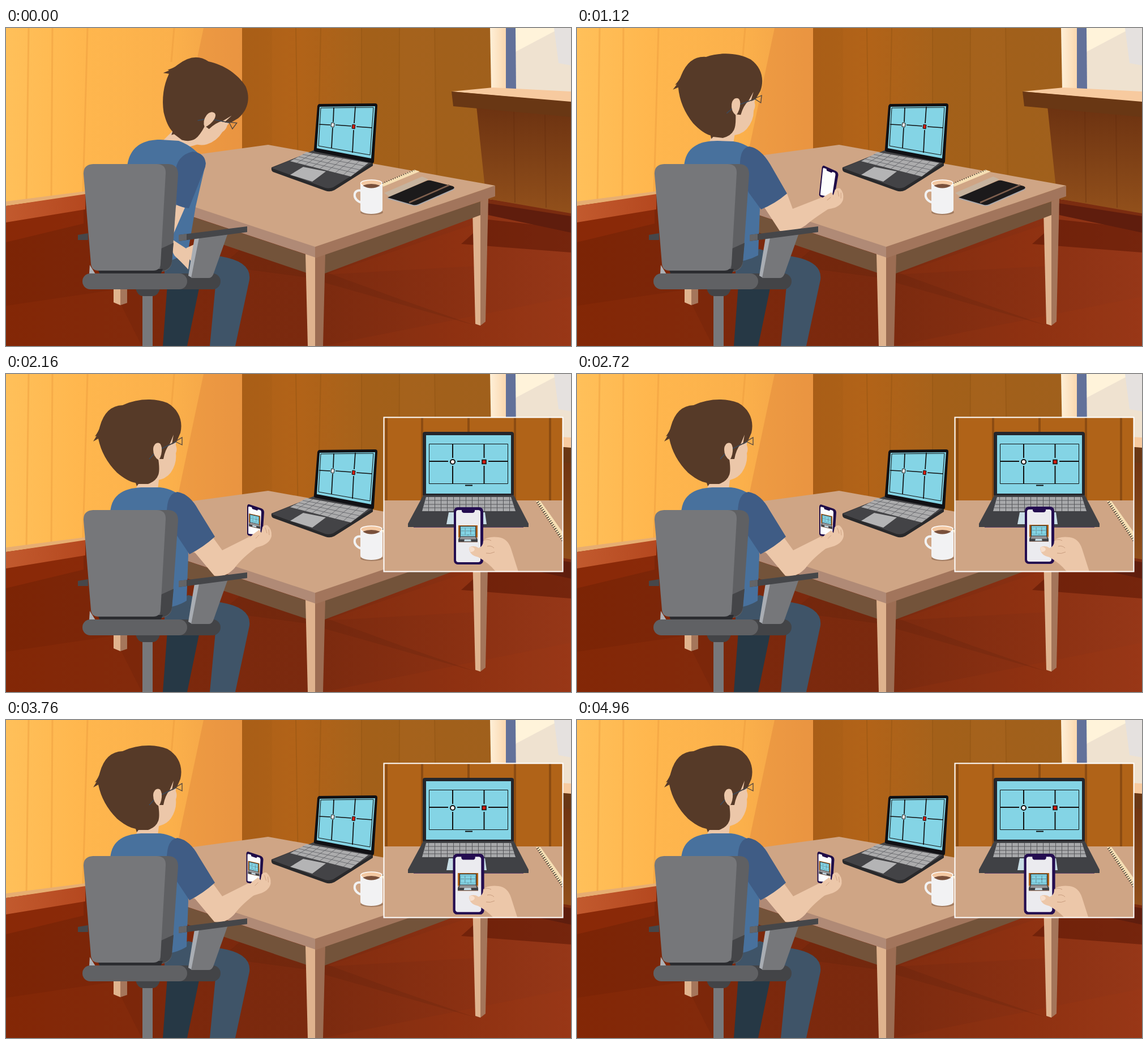
An HTML page for the animation above (5.04 s loop, 998 by 561 pixels).

```html
<!DOCTYPE html>
<html lang="en">
<head>
<meta charset="utf-8">
<title>Scanning a laptop screen with a phone</title>
<style>
  html, body { margin: 0; height: 100%; overflow: hidden; background: #84290c; }
  body > svg { display: block; width: 100vw; height: 100vh; }
  .skin { fill: #ecc7a9; }
  .line { fill: none; stroke: #111; }
</style>
</head>
<body>
<svg viewBox="0 0 998 561" preserveAspectRatio="none">
  <defs>
    <linearGradient id="sunny"><stop stop-color="#ffc05a"/><stop offset=".3" stop-color="#ffb74e"/><stop offset=".7" stop-color="#fbb04b"/><stop offset="1" stop-color="#f0a046"/></linearGradient>
    <linearGradient id="wood"><stop stop-color="#ad6018"/><stop offset=".22" stop-color="#b26318"/><stop offset=".5" stop-color="#a6621b"/><stop offset="1" stop-color="#a3621e"/></linearGradient>
    <linearGradient id="floor"><stop stop-color="#7c2405"/><stop offset=".3" stop-color="#7c280c"/><stop offset=".55" stop-color="#7b2a0f"/><stop offset=".8" stop-color="#8a3012"/><stop offset="1" stop-color="#963718"/></linearGradient>
    <linearGradient id="panel" x2="0" y2="1"><stop stop-color="#6c3211"/><stop offset="1" stop-color="#92501b"/></linearGradient>
    <linearGradient id="frame"><stop stop-color="#fff0d8"/><stop offset="1" stop-color="#f9d6ad"/></linearGradient>
    <linearGradient id="skirting"><stop stop-color="#c25a2e"/><stop offset="1" stop-color="#b5481f"/></linearGradient>
    <clipPath id="insetClip"><path d="M667 76H984V349H667Z"/></clipPath>
  </defs>

  <!-- room -->
  <path fill="url(#floor)" d="M0 280H998V561H0Z"/>
  <path fill="#982f0a" opacity=".5" d="M0 343L137 320V345L0 378Z"/>
  <path fill="#a83a14" opacity=".14" d="M0 490L190 462 240 561H0ZM560 561L998 474V561ZM563 435L830 345V420Z"/>
  <path fill="#56200c" opacity=".2" d="M380 420L530 440 830 525 700 480 563 430 420 385Z"/>
  <path fill="#5c1705" opacity=".55" d="M804 381L852 338 998 354V396Z"/>
  <path fill="url(#sunny)" d="M0 0H418V260L0 313Z"/>
  <path fill="#e48a3c" opacity=".5" d="M349 0H418V220L300 232Z"/>
  <path fill="none" stroke="#e8963a" stroke-width="3" opacity=".4" d="M144 0L136 290M297 0L292 60M82 0L80 300M40 0L36 308"/>
  <path fill="#e7ae72" d="M0 306L140 288V294L0 314Z"/>
  <path fill="url(#skirting)" d="M0 314L140 293V320L0 343Z"/>
  <path fill="url(#wood)" d="M417 0H858V310H417Z"/>
  <path fill="#8a4d12" opacity=".1" d="M417 0H470V260H417ZM628 0H695V270H628ZM757 0H858V310H757Z"/>
  <path fill="none" stroke="#8d5013" stroke-width="2" opacity=".4" d="M512 0L516 260M556 0L553 140M695 0L694 260M757 0L761 260M628 0V135"/>
  <path fill="#5f1d0d" d="M850 302L998 325V361L852 330Z"/>
  <path fill="#7b2c10" d="M850 302L998 325V332L850 309Z"/>
  <path fill="url(#panel)" d="M831 138H998V327L848 301Z"/>
  <path fill="none" stroke="#5c2a0d" opacity=".3" stroke-width="2" d="M897 145L899 308M952 150L954 317"/>
  <path fill="#efe2d0" d="M898 0H998V120H898Z"/>
  <path fill="#fff3da" d="M900 0H968L972 4 900 42Z"/>
  <path fill="#e5e1df" d="M968 0H998V66L976 62Z"/>
  <path fill="url(#frame)" d="M855 0H884V108H857Z"/>
  <path fill="#62719a" d="M883 0H900L901 108H883Z"/>
  <path fill="#f7ca9f" d="M787 112L860 105 998 112V131Z"/>
  <path fill="#693714" d="M787 112L998 130V157L790 138Z"/>

  <!-- table -->
  <path fill="#e0b48e" d="M190 450H202V489L190 484Z"/><path fill="#a5765b" d="M202 450H214V485L202 489Z"/>
  <path fill="#dfb38e" d="M824 320H838V525L829 522Z"/>
  <path fill="#73533a" d="M200 290L531 400V432L200 320ZM563 398L838 306V330L563 433Z"/>
  <path fill="#a4755a" d="M838 306L852 300 847 518 838 525Z"/>
  <path fill="#dfb38e" d="M529 398L547 404 546 561H533Z"/><path fill="#9c6d53" d="M546 404L564 397 560 561H546Z"/>
  <path fill="#b08a76" d="M170 262L547 385V405L170 280Z"/>
  <path fill="#a2755c" d="M546 385L864 278V297L546 406Z"/>
  <path fill="#cfa585" d="M170 246L463 206 864 278 546 386 170 262Z"/>

  <!-- laptop -->
  <path fill="#29292b" d="M469 246L545 216 648 238V243L580 286Q572 290 564 287L472 254Q468 252 469 246Z"/>
  <path fill="#434346" d="M469 247L545 215 648 237 578 281Q571 284 564 282Z"/>
  <path fill="#acacad" d="M531 219L640 238 609 262 502 235Z"/>
  <path class="line" stroke-width=".9" style="stroke:#66676b" d="M524 223L632 243M517 227L624 250M509 231L617 256M542 221L514 238M555 223L528 242M569 226L541 245M582 228L555 248M596 230L568 252M610 233L582 255M624 235L596 259"/>
  <path fill="#b4b4b5" d="M525 245L565 253 541 271 502 259Z"/>
  <path fill="#101014" d="M554 134L652 133Q656 133 656 137L650 235Q650 239 646 238L546 218Q543 217 544 213L550 138Q551 134 554 134Z"/>
  <path fill="#84d4e5" d="M554 139L652 138 645 230 549 212Z"/>
  <path class="line" d="M556 141L649 140 643 224 552 208Z"/>
  <path class="line" stroke-width="1.7" d="M579 140L578 166M577 176L575 212M617 139L615 168M614 180L612 220M553 170L573 171M582 171L610 173M619 174L647 176"/>
  <path fill="#fff" stroke="#111" d="M575 167L580 168 579 175 574 174Z"/>
  <path fill="#d21c10" stroke="#111" d="M612 170L617 171 616 178 611 177Z"/>

  <!-- ruler, tablet, mug -->
  <path fill="#c7b39e" d="M668 291L735 262 746 267 678 298Z"/>
  <path fill="#f6dfb4" d="M664 275L721 250 731 253 666 280Z"/>
  <path class="line" stroke-dasharray="1 3" stroke-width="2" d="M665 274L721 251"/>
  <path fill="#a9a9ad" d="M673 301L744 270 792 283V285L728 313Q722 315 717 313Z"/>
  <path fill="#1c1a1b" d="M674 299L742 270Q746 268 750 269L789 279Q794 281 790 284L728 311Q723 313 719 312Z"/>
  <path fill="none" stroke="#80604e" stroke-width="2.5" d="M712 308L783 277"/>
  <ellipse cx="646" cy="325" rx="20" ry="5" fill="#87634c" opacity=".6"/>
  <path fill="none" stroke="#f2f2f2" stroke-width="4" d="M628 287C612 283 611 305 629 308"/>
  <path fill="#f2f2f3" d="M626 273H665V320Q665 327 645 328 626 327 626 320Z"/>
  <ellipse cx="645.5" cy="274" rx="19" ry="6" fill="#f3c8a2" stroke="#fff" stroke-width="1.5"/>
  <path fill="#79503b" d="M630 278Q645 272 661 278 645 287 630 278Z"/>

  <!-- person -->
  <path fill="#263845" d="M286 440H345L320 561H277Z"/>
  <path fill="#3f5468" d="M280 410L322 390Q355 400 380 403 434 412 430 444L405 561H360L370 455 280 450Z"/>
  <path class="skin" id="neck"/>
  <path fill="#48719d" id="torso"/>
  <path class="skin" id="arm"/>
  <path fill="#3f5c85" id="sleeve"/>
  <g id="head"><g transform="translate(-233.5 -118)">
    <path class="skin" d="M262 110L300 108 300 126Q303 132 300 140 302 158 291 174 282 186 264 188L245 195Z"/>
    <path fill="#563a28" d="M154 119L160 109 157 110Q164 101 166 92 176 56 206 55C232 43 262 42 285 51 306 63 313 84 308 104L302 118Q297 123 293 124L296 107 289 124Q281 133 278 150L269 150Q272 170 269 178 265 189 251 194L234 194 231 198 229 192Q215 190 196 174 170 148 163 114Z"/>
    <path fill="none" stroke="#3b4b5e" stroke-width="1.5" d="M253 150L266 136 301 119"/>
    <path fill="none" stroke="#4d443f" stroke-width="1.3" d="M289 125L311 112 311 125 299 119"/>
    <path class="skin" d="M264 123Q273 118 275 130 276 142 270 152 260 146 260 133 260 127 264 123Z"/>
  </g></g>

  <g id="wobble"><g id="grip"><g transform="translate(-450 -287)">
    <path fill="#1f0c48" d="M430 230L451 237Q456 239 456 244L453 286Q453 290 449 289L429 285Q426 284 426 281V233Q427 229 430 230Z"/>
    <path fill="#fdfdfd" d="M430 234L434 235 435 238 444 241 445 239 449 240Q451 241 451 244L449 284 429 282Q428 282 428 280V236Q428 233 430 234Z"/>
    <g class="camera" transform="translate(429 246) skewY(13)"><svg width="20" height="23" viewBox="720 95 194 180" preserveAspectRatio="none"><use href="#desk"/></svg></g>
    <path class="skin" d="M427 292L436 283 447 275 451 280 453 270Q457 265 462 267 470 274 469 286 466 299 449 304L436 308Z"/>
    <path fill="none" stroke="#cfa383" d="M458 271L461 281M464 274L465 284M447 284L441 290"/>
  </g></g></g>

  <!-- chair -->
  <path fill="#46474a" d="M127 365L145 362V374H127Z"/>
  <path fill="#adb1b6" d="M148 418L158 434H147Z"/>
  <path fill="#77787b" d="M241 465H259V561H241Z"/>
  <path fill="#434447" d="M228 455H273Q270 473 258 473H243Q231 473 228 455ZM300 433H365A14 14 0 0 1 365 461H300Z"/>
  <path fill="#5f6063" d="M255 240H287Q304 241 304 258L293 414Q291 427 276 430L250 430Z"/>
  <path fill="#444548" d="M274 389L296 379 293 412Q291 427 272 430Z"/>
  <path fill="#2b2c30" d="M162 425H277L273 435H166Z"/>
  <path fill="#76777a" d="M154 240H266Q283 240 282 257L273 416Q272 428 260 428H163Q151 428 150 416L137 258Q136 241 154 240Z"/>
  <rect x="135" y="433" width="185" height="28" rx="14" fill="#606164"/>
  <path fill="#a9adb3" d="M333 370H342L329 441 322 437Z"/>
  <path fill="#76777a" d="M341 370L392 362 366 435Q363 441 358 441H327Z"/>
  <path fill="#454649" d="M305 365L426 350V360L305 376Z"/>
  <path fill="#636467" d="M305 365L319 363V374L305 376Z"/>

  <!-- close-up -->
  <g id="inset">
    <g clip-path="url(#insetClip)">
      <g id="desk">
        <path fill="#b06318" d="M667 76H984V224H667Z"/>
        <path fill="none" stroke="#8c4c12" stroke-width="4" d="M672 76V224M735 76V224M817 76V224M899 76V224M961 76V224"/>
        <path fill="#cfa585" d="M667 223H984V349H667Z"/>
        <rect x="736" y="102" width="161" height="114" rx="4" fill="#25262b"/>
        <path fill="#84d4e5" d="M742 108H892V211H742Z"/>
        <path class="line" d="M747.5 123.5H886.5V193.5H747.5Z"/>
        <path class="line" stroke-width="2" d="M789 123V148M789 162V193M844.5 123V148M844.5 162V193M748 154H781M797 154H837M852 154H886M811 196.5H824"/>
        <circle cx="789" cy="155" r="4" fill="#fff" stroke="#111" stroke-width="2"/>
        <path fill="#d21c10" stroke="#111" stroke-width="1.5" d="M841 151.500H848V158.500H841Z"/>
        <path fill="#404145" d="M737 214H897L923 264V270H710V264Z"/>
        <path fill="#a8a9ab" d="M742 217H892L900 242H735Z"/>
        <path class="line" style="stroke:#56575b" d="M741 223H894M739 230H896M737 236H898"/>
        <path class="line" style="stroke:#56575b" stroke-width="25" stroke-dasharray="1 10" d="M746 229.500H894"/>
        <path fill="#c8dde5" d="M782 244H846L849 265H778Z"/>
        <path fill="none" stroke="#6b4a70" d="M720 270.500H914"/>
        <path fill="#f6dfb4" d="M936 224H944L984 280V296Z"/>
        <path class="line" stroke-width="5" stroke-dasharray="1 3" d="M939 226L984 294"/>
      </g>
      <g id="phone">
        <rect width="52" height="101" rx="7" fill="#240d50"/>
        <rect x="4" y="5" width="43" height="92" rx="4" fill="#ebebef"/>
        <path fill="#240d50" d="M14 4H37V7Q36 10 33 10H18Q15 10 14 7Z"/>
        <svg class="camera" x="8" y="32" width="34" height="30" viewBox="720 95 194 180" preserveAspectRatio="none"><use href="#desk"/></svg>
      </g>
      <g id="thumb">
        <path class="skin" d="M818 306Q826 301 835 307 843 304 843 294 850 286 870 288 886 290 892 308L907 355H870Q856 335 834 323 818 320 818 306Z"/>
        <path fill="#f8dfcc" d="M818 306Q825 303 828 309 827 314 820 314Z"/>
        <path fill="none" stroke="#c99d7f" d="M843 294Q850 290 857 294M850 304Q857 302 862 307M848 316Q855 318 863 314"/>
      </g>
    </g>
    <path fill="none" stroke="#fff" stroke-width="2" d="M667.500 76.500H983.500V348.500H667.500Z"/>
  </g>
</svg>
<script>
const LOOP = 5040, STEP = 80, RISE = 1520;
const $ = id => document.getElementById(id);
const clamp = x => Math.min(1, Math.max(0, x));
const smooth = x => x * x * (3 - 2 * x);
const NUMBER = /-?\d*\.?\d+/g;

// Blends the numbers of two strings that share one structure.
function blend(a, b, k) {
  const ends = b.match(NUMBER);
  let i = 0;
  return a.replace(NUMBER, n => (+n + (ends[i++] - n) * k).toFixed(2));
}

function sample(stops, keys, x) {
  let i = 0;
  while (i < stops.length - 2 && x > stops[i + 1]) i++;
  return blend(keys[i], keys[i + 1], clamp((x - stops[i]) / (stops[i + 1] - stops[i])));
}

// Poses while the person sits up and raises the phone.
const RISE_STOPS = [0, .383, .828, 1];
const poses = {
  head: ["translate(342 126) rotate(36.7)", "translate(302 119.5) rotate(22.5)",
    "translate(248.5 116.5) rotate(6.3)", "translate(233.5 118) rotate(0)"],
  grip: ["translate(333 400) rotate(95) scale(.75)", "translate(403 386) rotate(42) scale(.87)",
    "translate(451 302) rotate(6) scale(1)", "translate(450 287) rotate(0) scale(1)"],
  neck: ["M298 178L350 202 322 210 276 200Z", "M273 180L318 190 300 208 260 200Z",
    "M238 188L280 180 276 204 234 202Z", "M234 188L271 178 268 204 230 202Z"],
  torso: [
    "M214 245C218 208 244 197 272 197L305 199Q335 210 353 238L335 315 322 392Q300 412 270 414L200 414Z",
    "M205 245C207 210 232 198 258 198L300 205Q325 212 335 240L325 322 322 402Q300 412 270 414L200 414Z",
    "M189 245C191 210 216 199 248 199L276 200Q303 204 320 225L323 320 320 401Q300 412 270 414L200 414Z",
    "M184 245C186 210 212 200 245 200L272 200Q300 203 318 225L322 320 319 400Q300 412 270 414L200 414Z"],
  arm: [
    "M301 311L316 317 292 372 326 394 322 426Q308 411 298 402 290 390 288 360Z",
    "M301 322L337 321 334 362 388 370 395 398Q370 392 340 390 315 389 300 387Z",
    "M330 315L371 292 381 319 432 299 446 318Q415 338 404 348 385 362 358 358Z",
    "M332 313L366 289 382 311 430 287 446 303Q416 325 404 342 388 360 368 356Z"],
  sleeve: [
    "M299 262Q298 225 330 218 356 222 352 245L323 318Q312 317 301 312L299 290Z",
    "M297 260Q297 222 320 214 343 216 344 250L341 321Q320 325 301 323L297 300Z",
    "M288 250Q286 212 304 209 324 212 341 240L371 292Q350 310 325 320L303 290Z",
    "M284 250Q283 210 303 208 325 212 340 240L369 287Q348 306 324 318L302 285Z"]
};

// Small drift while the camera is being aimed.
const AIM_STOPS = [2240, 2720, 3360];
const aims = {
  wobble: ["translate(0 0)", "translate(2 .5)", "translate(-1.5 2.5)"],
  phone: ["translate(791 235) scale(1 1)", "translate(791 234) scale(1 1)", "translate(789.5 236) scale(1.06 1.06)"],
  thumb: ["translate(0 0)", "translate(0 0)", "translate(0 5)"]
};

const cameras = document.querySelectorAll(".camera");

function apply(tracks, stops, x) {
  for (const id in tracks)
    $(id).setAttribute(tracks[id][0][0] === "M" ? "d" : "transform", sample(stops, tracks[id], x));
}

function draw() {
  const t = Math.floor(performance.now() % LOOP / STEP) * STEP;
  const shown = clamp((t - 1840) / 320);
  apply(poses, RISE_STOPS, smooth(clamp(t / RISE)));
  apply(aims, AIM_STOPS, t);
  $("inset").style.opacity = shown;
  cameras.forEach(camera => camera.style.opacity = shown);
  requestAnimationFrame(draw);
}
draw();
</script>
</body>
</html>
```
